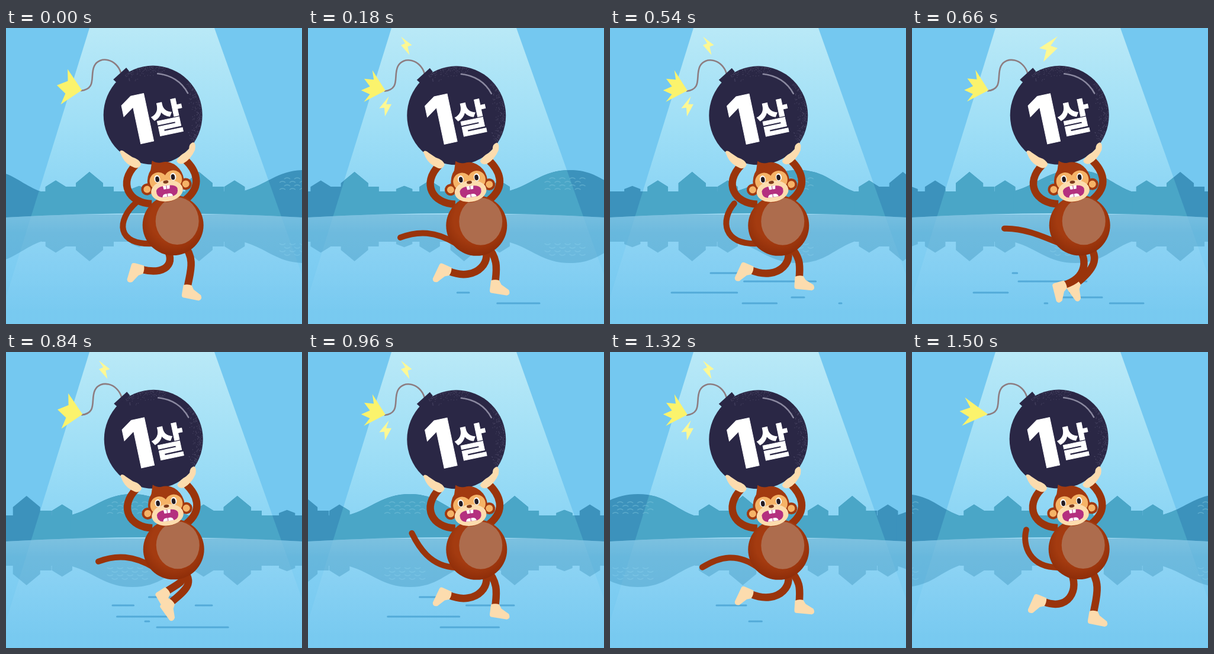
Recreate the animation shown at these times as an HTML page. Size 500 px wide and 500 px high, loop 1.53 s.

```html
<!DOCTYPE html>
<html lang="ko">
<head>
<meta charset="utf-8">
<title>Running monkey</title>
<style>
  html, body { margin: 0; width: 100%; height: 100%; overflow: hidden; background: #74c8f0; }
  svg { display: block; width: 100vw; height: 100vh; }
  .limb { fill: none; stroke: #9a340b; stroke-width: 12.5; }
  .fur { fill: #a23a10; }
  .skin { fill: #fcdcae; }
  .bomb { fill: #2a2745; }
  .one { font: 900 113px Inter, Roboto, sans-serif; }
  .age { font: 900 62px "Noto Sans CJK KR", "Noto Sans CJK", "Noto Sans CJK JP", sans-serif; }
  .label { fill: #fff; stroke: #fff; text-anchor: middle; }
</style>
</head>
<body>
<svg viewBox="0 0 500 500">
  <defs>
    <linearGradient id="light" gradientUnits="userSpaceOnUse" x1="0" y1="0" x2="0" y2="320">
      <stop offset="0" stop-color="#b9e9f7"/>
      <stop offset=".5" stop-color="#a0dff6"/>
      <stop offset="1" stop-color="#86d2f4"/>
    </linearGradient>
    <linearGradient id="water" gradientUnits="userSpaceOnUse" x1="0" y1="312" x2="0" y2="480">
      <stop offset="0" stop-color="#9edcf6"/>
      <stop offset=".2" stop-color="#84d0f3"/>
      <stop offset="1" stop-color="#74c8f0"/>
    </linearGradient>
    <linearGradient id="glow" gradientUnits="userSpaceOnUse" x1="0" y1="312" x2="0" y2="480">
      <stop offset="0" stop-color="#fff" stop-opacity=".1"/>
      <stop offset="1" stop-color="#fff" stop-opacity=".03"/>
    </linearGradient>
    <radialGradient id="fur" cx=".5" cy=".4" r=".62">
      <stop offset=".6" stop-color="#a43b10"/>
      <stop offset="1" stop-color="#8c2c08"/>
    </radialGradient>
    <path id="shore" d="M0 320Q250 306 500 320V500H0Z"/>
    <path id="beam" d="M141 0H352L500 417V500H0V455Z"/>
    <clipPath id="lake"><use href="#shore"/></clipPath>
    <clipPath id="lit"><use href="#beam"/></clipPath>
    <g id="town">
      <path id="houses"/>
      <path d="M400 322V276C443 264 458 240 505 240C552 240 565 265 605 278V322Z"/>
      <path id="marks" fill="none" stroke="#7cc4dc" stroke-width="1.5" opacity=".5"/>
    </g>
    <g id="towns">
      <use href="#town" x="-541"/><use href="#town"/><use href="#town" x="541"/>
    </g>
    <path id="foot" class="skin" d="M-7 -3Q0 -5 7 -2L10 5L22 15Q25 23 18 24L-8 18Q-11 17 -10 12Z"/>
    <path id="bolt" d="M15 -20L-16 0L-4 3L-9 23L15 0L3 -4Z"/>
  </defs>

  <rect width="500" height="500" fill="#74c8f0"/>
  <use href="#beam" fill="url(#light)"/>
  <use class="scroll" href="#towns" fill="#3c92bc"/>
  <g clip-path="url(#lit)"><use class="scroll" href="#towns" fill="#4aa6c7"/></g>
  <use href="#shore" fill="url(#water)"/>
  <g clip-path="url(#lake)">
    <use href="#beam" fill="url(#glow)"/>
    <g opacity=".38" transform="matrix(1 0 0 -1 0 637)"><use class="scroll" href="#towns" fill="#3c92bc"/></g>
  </g>
  <path id="dashes" fill="none" stroke="#4ea7d5" stroke-width="3" stroke-linecap="round" opacity=".9"/>

  <path id="tail" class="limb" style="stroke-width:10" stroke-linecap="round"/>
  <g id="leg2"><path class="limb"/><use href="#foot"/></g>
  <g id="leg1"><path class="limb"/><use href="#foot"/></g>

  <g id="upper">
    <path class="limb" d="M246 297C208 296 188 262 219 231"/>
    <path class="limb" d="M303 290C333 266 321 240 302 222"/>
    <ellipse cx="282" cy="333" rx="51.5" ry="51" fill="url(#fur)"/>
    <ellipse cx="289" cy="326" rx="36.5" ry="40" fill="#ad6c4d"/>

    <path fill="none" stroke="#8d7c80" stroke-width="2.600" d="M194 76C187 52 158 46 149 64C141 80 154 103 126 106"/>
    <path class="bomb" d="M181 87L203 67L208 73L192 97Z"/>
    <circle class="bomb" cx="248" cy="147" r="83.500"/>
    <path id="grain" fill="none" stroke="#4a4664" stroke-width="1.200" stroke-linecap="round"/>
    <path fill="none" stroke="#8b89a0" stroke-width="2.500" stroke-linecap="round" d="M256 77Q291 81 307 110"/>
    <g transform="rotate(-12 221 155)">
      <text class="label one" x="221" y="196" stroke-width="1">1</text>
    </g>
    <g transform="rotate(-12 273 151)">
      <text class="label age" x="273" y="174" stroke-width="1">살</text>
    </g>

    <g transform="translate(270 262) rotate(-8)">
      <g class="fur">
        <circle cx="-33" cy="6" r="10"/><circle cx="33" cy="6" r="10"/>
        <ellipse cy="-2" rx="31" ry="34"/>
        <path d="M-24 -20L-18 -41Q-10 -34 4 -35Z"/>
      </g>
      <g fill="#f5b367">
        <circle cx="-33" cy="6" r="6"/><circle cx="33" cy="6" r="6"/>
        <circle cx="-12" cy="-5" r="15"/><circle cx="13" cy="-5" r="15"/>
      </g>
      <ellipse class="skin" cy="13" rx="27" ry="18"/>
      <g fill="#fff">
        <ellipse cx="-13.700" cy="-9" rx="5" ry="6.500"/><ellipse cx="13.600" cy="-9" rx="5" ry="6.500"/>
      </g>
      <g fill="#241b22">
        <ellipse cx="-13.500" cy="-8.500" rx="3.300" ry="4.800"/><ellipse cx="13.200" cy="-8.500" rx="3.300" ry="4.800"/>
      </g>
      <ellipse cy="-2" rx="4.500" ry="2.600" fill="#7d3a1b"/>
      <path fill="#b4307f" d="M-18 11Q-16 4 0 4Q16 4 18 11Q19 21 10 23H-10Q-19 21 -18 11Z"/>
      <path fill="#fff" d="M-6 4H-.5V10H-5ZM.5 4H6L5 10H.5ZM-9 23Q-8 17 -1 18V23ZM0 23V18Q8 17 9 23Z"/>
    </g>

    <path class="skin" d="M192 209Q194 204 201 210L213 218Q226 222 228 230Q225 238 217 236Q202 230 196 218Z"/>
    <path class="skin" d="M309 204Q309 195 316 193Q321 194 319 206Q312 222 299 229Q290 231 288 224Q293 215 303 210Z"/>
    <path id="spark" fill="#fbf36c"/>
  </g>
  <g fill="#fdf894">
    <use id="bolt1" href="#bolt" transform="translate(166 29) scale(-.6 .72)"/>
    <use id="bolt2" href="#bolt" transform="translate(131 132) rotate(-18) scale(.7)"/>
    <use id="bolt3" href="#bolt" transform="translate(231 34)"/>
  </g>
</svg>

<script>
const STEP = 30, LOOP = 1530;
const RUN = 13, SWISH = 52 / 3, DASH = 17.1;      // cycle lengths in steps
const { sin, cos, hypot, max, min, PI } = Math;
const $ = id => document.getElementById(id);
const rad = deg => deg * PI / 180;
const wave = (step, period) => cos(2 * PI * step / period);

function house(x, size) {
  const half = 10 + 13 * size, eave = 276 - 14 * size, peak = 276 - 33 * size;
  return `M${x - half} 322V${eave}L${x} ${peak}L${x + half} ${eave}V322Z`;
}

function buildTown() {
  const small = 0.56, tall = 1;
  let d = "M60 322V276H405V322Z";
  for (const x of [84, 268, 386]) d += house(x, small);
  for (const x of [141, 326]) d += house(x, tall);
  d += house(225, 0.28);
  for (const x of [100, 162, 348]) d += `M${x} 322V268h20V322Z`;
  $("houses").setAttribute("d", d);

  let marks = "";
  for (let row = 0; row < 4; row++)
    for (let i = 0; i < 4; i++)
      marks += `M${470 + i * 17 - row % 2 * 8} ${255 + row * 6}q5 -4 10 0`;
  $("marks").setAttribute("d", marks);
}

let seed = 7;
const rnd = () => (seed = seed * 16807 % 2147483647) / 2147483647;

// speckles along the rim of the bomb, between two angles
function grain(count, from, to) {
  let d = "";
  for (let i = 0; i < count; i++) {
    const a = rad(from + (to - from) * rnd()), r = 82 - 18 * rnd() * rnd();
    d += `M${248 + r * cos(a)} ${147 + r * sin(a)}h.1`;
  }
  return d;
}

const LEGS = [
  { id: "leg1", lead: 1.3, x: 270, reach: 50, y: 420, lowAt: 8, hip: 282, sway: 20 },
  { id: "leg2", lead: 7.5, x: 274, reach: 37, y: 425, lowAt: 11.5, hip: 297, sway: 3 }
];

// the ankle runs round an ellipse, and the foot tips up as it goes back
function drawLeg(leg, step) {
  const swing = -wave(step + leg.lead, RUN);
  const x = leg.x + leg.reach * swing, y = leg.y + 16 * wave(step - leg.lowAt, RUN);
  const hip = leg.hip + leg.sway * swing, tilt = 48 - 56 * swing;
  const pull = 22 + 0.3 * tilt, a = rad(tilt + 10);
  const [shin, foot] = $(leg.id).children;
  shin.setAttribute("d",
    `M${hip} 366C${hip + 22} 389 ${x + pull * sin(a)} ${y - pull * cos(a)} ${x} ${y}`);
  foot.setAttribute("transform", `translate(${x} ${y}) rotate(${tilt})`);
}

function tailPath(step) {
  const lift = wave(step + 0.34, SWISH), curl = max(0, lift) ** 3;
  return `M250 364C${215 - 30 * curl} ${353 + 15 * lift} 186 ${335 - 11 * lift}` +
    ` ${156 + 66 * curl} ${330 - 36 * lift}`;
}

// y, left, right, first step
const DASHES = [
  [414, 170, 285, 7.6],
  [428, 180, 348, 8.8],
  [447, 104, 272, 4.5],
  [455, 235, 328, 16.4],
  [465, 224, 391, 0.6]
];

// each streak slides left through its own window, twice per loop
function dashPath(step) {
  let d = "";
  for (const [y, left, right, first] of DASHES)
    for (const start of [first, first + DASH]) {
      const front = right - 13.2 * (step - start);
      const head = max(left, front), tail = min(right, front + 0.72 * (right - left));
      if (tail - head > 1) d += `M${head} ${y}H${tail}`;
    }
  return d;
}

// a fan of flames around the end of the fuse
function flame(tips, centre, spread, size) {
  const count = 2 * tips - 2;
  let d = "M128 105";
  for (let i = 0; i <= count; i++) {
    const a = rad(centre + spread * (i / count - 0.5));
    const r = i % 2 ? size * 0.66 : size;
    d += `L${128 + r * cos(a)} ${105 - r * sin(a)}`;
  }
  return d + "Z";
}

const show = (id, on) => $(id).setAttribute("visibility", on ? "visible" : "hidden");

function render(step) {
  const phase = step % RUN;
  for (const el of document.querySelectorAll(".scroll"))
    el.setAttribute("transform", `translate(${-step * 541 / 52})`);
  for (const leg of LEGS) drawLeg(leg, step);
  $("tail").setAttribute("d", tailPath(step));
  $("dashes").setAttribute("d", dashPath(step));

  const bob = 1 - wave(phase + 1, RUN);
  $("upper").setAttribute("transform", `translate(${bob * 1.4} ${bob * 0.4})`);

  $("spark").setAttribute("d",
    phase < 4 ? flame(3, 169, 90, 43) :
    phase < 10 ? flame(4, 165, 85, 41) : flame(3, 174, 60, 48));
  show("bolt1", phase >= 1 && phase < 7);
  show("bolt2", phase >= 4 && phase < 7);
  show("bolt3", phase >= 7 && phase < 10);
}

function tick() {
  render(Math.floor(performance.now() % LOOP / STEP));
  requestAnimationFrame(tick);
}

buildTown();
$("grain").setAttribute("d", grain(190, -42, 35) + grain(110, -125, -75));
tick();
</script>
</body>
</html>
```
